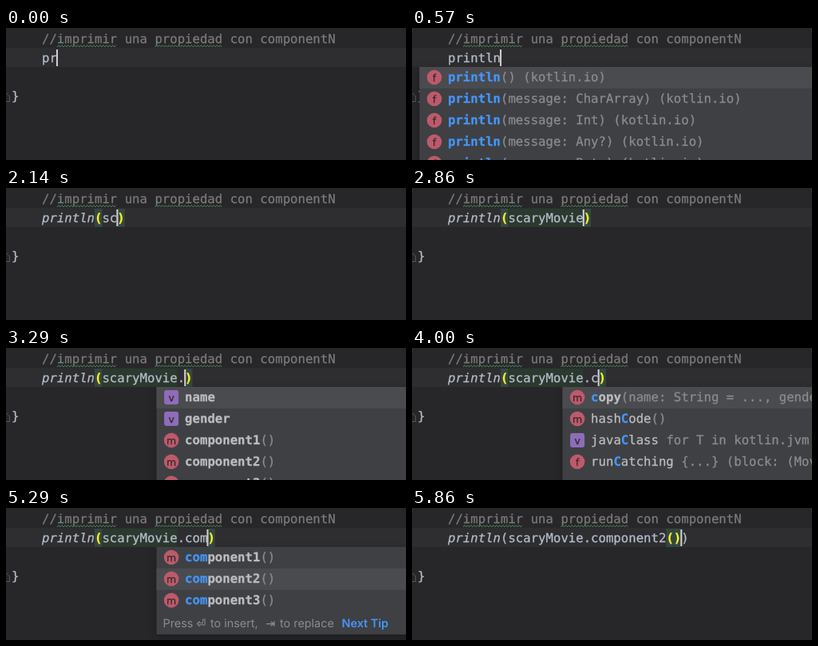
An HTML page that plays this animation: 501 by 166 pixels, repeating every 6.01 s.

```html
<!DOCTYPE html>
<html lang="es">
<head>
<meta charset="utf-8">
<title>Autocompletado en el editor</title>
<style>
  html, body { margin: 0; width: 100%; height: 100%; overflow: hidden; background: #272629; }
  svg { display: block; width: 501px; height: 166px; }
  text {
    font: 15.66px "DejaVu Sans Mono", monospace; white-space: pre; text-rendering: geometricPrecision;
    fill: currentColor; stroke: currentColor; stroke-width: .25px;
  }
  .code { color: #b4becb; }
  .comment { color: #7b7b7d; }
  .call { color: #b4becb; font-style: italic; }
  .pair { color: #ffef28; font-weight: bold; }
  .name { color: #bcbdbf; }
  .tail { color: #8b8c8f; }
  .match { color: #4496fb; font-weight: bold; }
  .bold { font-weight: bold; }
  .hint { font: 14.4px Inter, sans-serif; color: #8b8c8f; stroke: none; }
  .key { font: 14px "DejaVu Sans", sans-serif; color: #8b8c8f; }
  .link { color: #4496fb; font-weight: 600; }
  .badge { font: 12.5px "DejaVu Sans", sans-serif; color: #35282c; text-anchor: middle; }
  .wave { fill: none; stroke: #4c8159; stroke-width: 1; }
  .panel { filter: drop-shadow(0 4px 6px #0004); }
</style>
</head>
<body>
<svg viewBox="0 0 501 166">
  <rect width="501" height="166" fill="#272629"/>
  <rect y="25" width="501" height="24" fill="#2e2d30"/>
  <path d="M-5 92.5H4.5V86L0 81.5" fill="none" stroke="#59595c"/>
  <g id="fixed"></g>
  <g id="line"></g>
  <g id="popup"></g>
</svg>
<script>
const LOOP = 6010, LEFT = 45, ADV = 9.427, ROW = 27, TOP = 49;
const byId = id => document.getElementById(id);
const colX = col => LEFT + col * ADV;
const label = (x, y, str, cls) => `<text x="${x}" y="${y}" class="${cls}">${str}</text>`;
const box = (x, y, w, h, fill, cls = "") =>
  `<rect x="${x}" y="${y}" width="${w}" height="${h}" fill="${fill}" class="${cls}"/>`;

// Rows: badge, name, tail, bold
const prints = ["", "message: CharArray", "message: Int", "message: Any?", "message: Byte"]
  .map(arg => ["f", "println", `(${arg}) (kotlin.io)`]);
const components = [1, 2, 3].map(n => ["m", "component" + n, "()", true]);
const lists = {
  print: { col: 0, rows: prints },
  local: { col: 8, rows: [
    ["v", "scaryMovie", "", true],
    ["c", "Scanner", " (java.util)"],
    ["c", "ScriptEngine", " (javax.script)"],
    ["c", "ScheduledFuture", " (java.util.concurrent)"],
    ["c", "ScriptContext", " (javax.script)"]] },
  members: { col: 19, rows: [["v", "name", "", true], ["v", "gender", "", true], ...components] },
  c: { col: 19, tip: "move", rows: [
    ["m", "copy", "(name: String = ..., gender: String", true],
    ["m", "hashCode", "()"],
    ["v", "javaClass", " for T in kotlin.jvm"],
    ["f", "runCatching", " {...} (block: (Movie"]] },
  com: { col: 19, rows: components, tip: "insert" }
};

// Tip pieces: offset from the popup edge, text, class
const tips = {
  move: [[8, "^↓", "key"], [35, "and", "hint"], [66, "^↑", "key"],
    [92, "will move caret down and up in the editor", "hint"]],
  insert: [[8, "Press", "hint"], [50, "⏎", "key"], [67.5, "to insert,", "hint"],
    [137, "⇥", "key"], [154.5, "to replace", "hint"], [232, "Next Tip", "hint link"]]
};

// Steps: start in ms, code with "|" at the caret, list, selected row
const steps = [
  [0, "pr|"],
  [140, "pri|"],
  [280, "prin|", "print", 0],
  [430, "printl|", "print", 0],
  [570, "println|", "print", 0],
  [1000, "println|", "print", 1],
  [1430, "println(|)"],
  [2000, "println(s|)"],
  [2140, "println(sc|)"],
  [2290, "println(sc|)", "local", 0],
  [2710, "println(scaryMovie|)"],
  [3140, "println(scaryMovie.|)"],
  [3290, "println(scaryMovie.|)", "members", 0],
  [3860, "println(scaryMovie.c|)", "c", 0],
  [4140, "println(scaryMovie.co|)", "com", 0],
  [4290, "println(scaryMovie.com|)", "com", 0],
  [4860, "println(scaryMovie.com|)", "com", 1],
  [5430, "println(scaryMovie.component2()|)"]
];

function wave(col, length) {
  const end = colX(col + length);
  let d = "", up = false;
  for (let x = colX(col); x <= end; x += 2, up = !up) d += `${d ? "L" : "M"}${x} ${up ? 21.5 : 24}`;
  return `<path class="wave" d="${d}"/>`;
}

function drawLine(marked) {
  const caret = marked.indexOf("|"), code = marked.replace("|", "");
  const open = code.indexOf("("), called = open > 0;
  const closed = code[caret - 1] === ")";
  const pair = !called ? [] : closed ? [caret - 2, caret - 1] : [open, code.length - 1];
  let out = "";
  if (code.includes("scaryMovie") && !closed) out += box(colX(8), 26, 10 * ADV, 23, "#2b392e");
  for (const col of pair) out += box(colX(col), 26, ADV, 23, "#34483f");

  let start = 0;
  const flush = end => {
    if (end > start) out += label(colX(start), 43, code.slice(start, end), called && start === 0 ? "call" : "code");
    start = end;
  };
  if (called) flush(open);
  for (const col of pair) {
    flush(col);
    out += label(colX(col), 43, code[col], "pair");
    start = col + 1;
  }
  flush(code.length);
  return out + box(colX(caret) - 0.9, 27, 2, 21, "#d3d3d5");
}

function drawBadge(kind, x, y) {
  const shape = kind === "v"
    ? `<rect x="${x - 9}" y="${y - 9}" width="18" height="18" rx="3" fill="#8e6cba"/>`
    : `<circle cx="${x}" cy="${y}" r="9.3" fill="${kind === "c" ? "#4f8fb0" : "#bd5a6b"}"/>`;
  return shape + label(x, y + 4.5, kind, "badge");
}

function drawPopup({ col, rows, tip }, selected, prefix) {
  const textX = colX(col), left = textX - 35.6;
  const bottom = TOP + rows.length * ROW;
  let out = box(left, TOP, 510, bottom - TOP + (tip ? 29 : 3), "#3f4043", "panel")
    + box(left, TOP + selected * ROW, 510, ROW, "#4a4b4f");
  rows.forEach(([kind, name, tail, bold], i) => {
    const mid = TOP + 13 + i * ROW;
    const at = name.toLowerCase().indexOf(prefix), end = at + prefix.length;
    const plain = bold ? "name bold" : "name";
    const put = (from, str, cls) => { if (str) out += label(textX + from * ADV, mid + 5.3, str, cls); };
    out += drawBadge(kind, textX - 17, mid);
    put(0, name.slice(0, at), plain);
    put(at, name.slice(at, end), "match");
    put(end, name.slice(end), plain);
    put(name.length, tail, "tail");
  });
  if (tip) for (const [x, str, cls] of tips[tip]) out += label(left + x, bottom + 20, str, cls);
  return out;
}

byId("fixed").innerHTML = label(LEFT, 19, "//imprimir una propiedad con componentN", "comment")
  + wave(2, 8) + wave(15, 9) + label(7, 91.3, "}", "code");

const began = performance.now();
let shown;
function tick() {
  const t = (performance.now() - began) % LOOP;
  const step = steps.filter(s => s[0] <= t).pop();
  if (step !== shown) {
    const [, code, list, selected] = shown = step;
    const prefix = code.split("|")[0].split(/[(.]/).pop();
    byId("line").innerHTML = drawLine(code);
    byId("popup").innerHTML = list ? drawPopup(lists[list], selected, prefix) : "";
  }
  requestAnimationFrame(tick);
}
tick();
</script>
</body>
</html>
```
